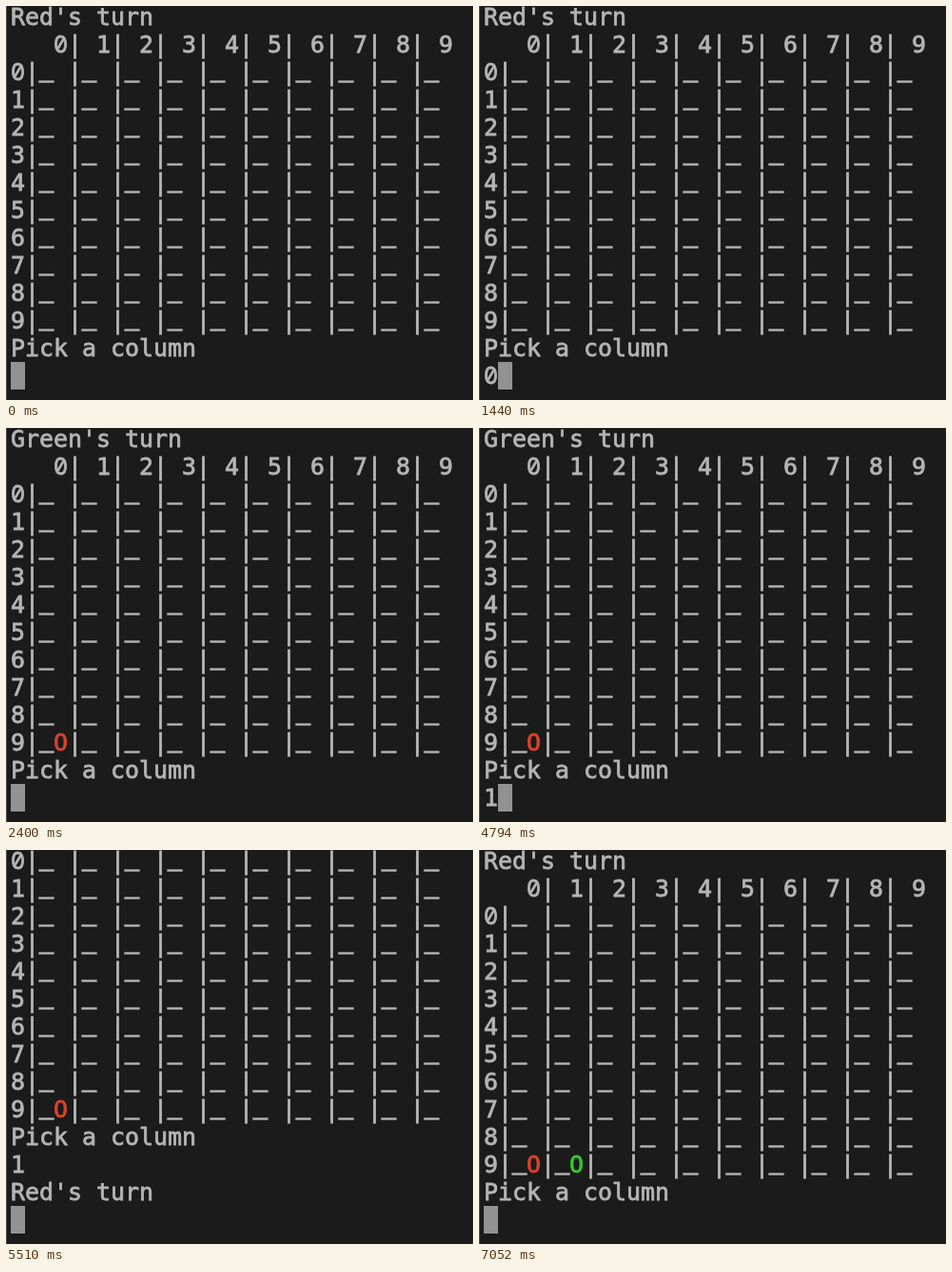
Recreate the animation shown at these times as an HTML page with a canvas. Size 491x414 px, loop 8000 ms.

```html
<!DOCTYPE html>
<html lang="en">
<head>
<meta charset="utf-8">
<title>Terminal board game</title>
<style>
  html, body { margin: 0; width: 100%; height: 100%; overflow: hidden; background: #1b1b1b; }
  canvas { display: block; }
</style>
</head>
<body>
<canvas id="screen" width="491" height="414"></canvas>
<script>
const ctx = document.getElementById('screen').getContext('2d');
const LEFT = 5, CELL = 15, LINE = 29, TOP = -3, BASE = 20;
const TEXT = '#b5b5b5', RED = '#d8432a', GREEN = '#35c72f';
const FONT = '24.9px "DejaVu Sans Mono", Menlo, monospace';
const ZERO_FONT = '25px "Noto Sans Mono", "DejaVu Sans Mono", monospace';

const digits = [...'0123456789'];
const header = '   ' + digits.join('| ');
const rows = digits.map(d => d + '|_ '.repeat(10));
const prompt = 'Pick a column';

const view = (player, typed = '') => [player + "'s turn", header, ...rows, prompt, typed];
const redPiece = row => ({ row, col: 3, color: RED });

const states = [
  { end: 1440, lines: view('Red') },
  { end: 2400, lines: view('Red', '0') },
  { end: 3720, lines: view('Green'), pieces: [redPiece(11)] },
  { end: 5510, lines: view('Green', '1'), pieces: [redPiece(11)] },
  { end: 5630, lines: [...rows, prompt, '1', "Red's turn", ''], pieces: [redPiece(9)] },
  { end: 8000, lines: view('Red'), pieces: [redPiece(11), { row: 11, col: 6, color: GREEN }] }
];

// A thin outline gives the heavier weight of smoothed terminal text.
function drawChar(ch, col, row, color = TEXT) {
  ctx.font = ch === '0' ? ZERO_FONT : FONT;
  ctx.fillStyle = ctx.strokeStyle = color;
  ctx.lineWidth = ch === '_' ? 1.4 : 0.8;
  const lift = ch === '_' ? 4 : 0; // underscores sit close to the baseline
  const x = LEFT + col * CELL, y = BASE + row * LINE - lift;
  ctx.fillText(ch, x, y);
  ctx.strokeText(ch, x, y);
}

function draw({ lines, pieces = [] }) {
  ctx.fillStyle = '#1b1b1b';
  ctx.fillRect(0, 0, 491, 414);
  ctx.fillStyle = '#484848';
  ctx.fillRect(0, 0, 1, 414);
  lines.forEach((line, row) => [...line].forEach((ch, col) => drawChar(ch, col, row)));
  pieces.forEach(p => drawChar('O', p.col, p.row, p.color));
  const last = lines.length - 1;
  ctx.fillStyle = '#929292';
  ctx.fillRect(LEFT + lines[last].length * CELL, TOP + last * LINE, CELL, LINE);
}

const start = performance.now();
function tick() {
  const t = (performance.now() - start) % 8000;
  draw(states.find(s => t < s.end));
  requestAnimationFrame(tick);
}
tick();
</script>
</body>
</html>
```
